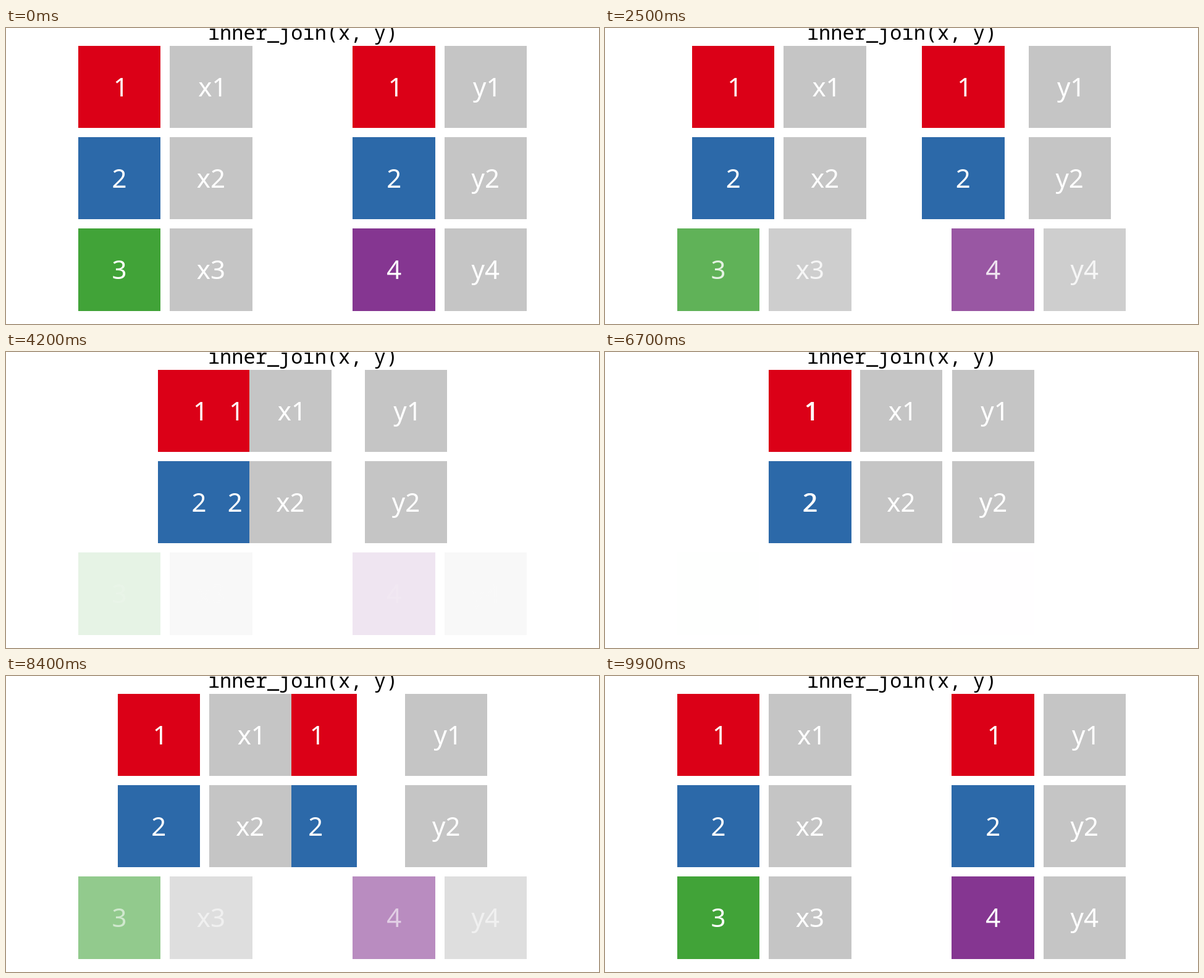
Animation, 960 px wide and 480 px high, one loop 10 s. Source, as an HTML page:

```html
<!DOCTYPE html>
<html lang="en">
<head>
<meta charset="utf-8">
<title>inner_join(x, y)</title>
<style>
  html, body { margin: 0; width: 100%; height: 100%; overflow: hidden; background: #fff; }
  svg { display: block; width: 960px; height: 480px; }
  text { text-anchor: middle; }
  .label { font: 42px "Noto Sans", "Open Sans", sans-serif; fill: #fff; }
  .title { font: 32px "Noto Sans Mono", "DejaVu Sans Mono", monospace; fill: #000; white-space: pre; }
</style>
</head>
<body>
<svg id="stage" viewBox="0 0 960 480">
  <text class="title" x="480.5" y="18.5">inner_join(x, y)</text>
</svg>
<script>
const LOOP = 10000, STEP = 100, SIZE = 133.33;
const RED = '#db0017', BLUE = '#2c69a9', GREEN = '#41a338', PURPLE = '#853691', GREY = '#c5c5c5';

// top, bottom and text baseline of each row
const rows = [[29, 162, 111], [177, 310, 259.2], [325, 459, 407.4]];

// columns in paint order: left edge apart, left edge joined, labels, fills
const columns = [
  { from: 561.495, to: 265.345, labels: ['1', '2', '4'], fills: [RED, BLUE, PURPLE] },
  { from: 116.95, to: 265.2, labels: ['1', '2', '3'], fills: [RED, BLUE, GREEN] },
  { from: 265.2, to: 413.1, labels: ['x1', 'x2', 'x3'], fills: [GREY, GREY, GREY] },
  { from: 709.66, to: 561.6, labels: ['y1', 'y2', 'y4'], fills: [GREY, GREY, GREY] }
];

const stage = document.getElementById('stage');

function add(parent, name, attrs = {}) {
  const node = document.createElementNS('http://www.w3.org/2000/svg', name);
  for (const key in attrs) node.setAttribute(key, attrs[key]);
  return parent.appendChild(node);
}

// labels stay above every tile
const tileLayer = add(stage, 'g');
const labelLayer = add(stage, 'g');

const cells = columns.flatMap(({ from, to, labels, fills }) =>
  rows.map(([top, bottom, base], i) => {
    const tile = add(tileLayer, 'rect', { y: top, height: bottom - top, fill: fills[i] });
    const label = add(labelLayer, 'text', { class: 'label', y: base });
    label.textContent = labels[i];
    const nudge = labels[i].endsWith('1') ? 2.5 : 0;
    return { from, to, tile, label, nudge, fades: i === 2 };
  }));

const clamp = v => Math.min(1, Math.max(0, v));
const sine = v => (1 - Math.cos(Math.PI * clamp(v))) / 2;

function progress(t) {
  return t < 6600 ? sine((t - 1600) / 3400) : 1 - sine((t - 6600) / 3300);
}

function draw(ms) {
  const p = progress(Math.floor((ms % LOOP) / STEP) * STEP);
  for (const { from, to, tile, label, nudge, fades } of cells) {
    const left = fades ? from : from + (to - from) * p;
    const x = Math.round(left);
    tile.setAttribute('x', x);
    tile.setAttribute('width', Math.round(left + SIZE) - x);
    label.setAttribute('x', (left + SIZE / 2 + nudge).toFixed(2));
    if (fades) {
      tile.setAttribute('opacity', 1 - p);
      label.setAttribute('opacity', 1 - p);
    }
  }
}

const start = performance.now();
function tick() {
  draw(performance.now() - start);
  requestAnimationFrame(tick);
}
tick();
</script>
</body>
</html>
```
